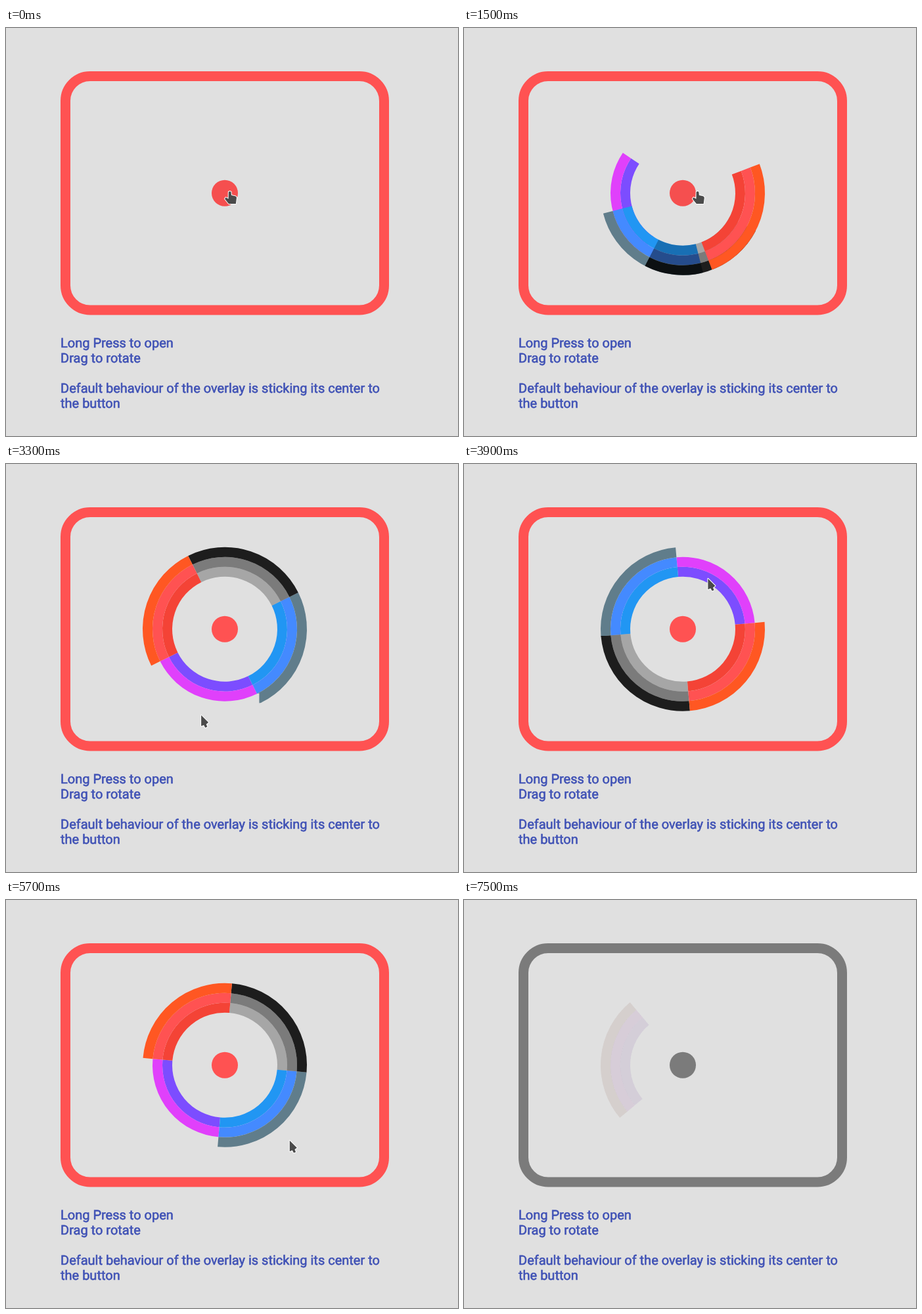
Recreate the animation shown at these times as an HTML page with a canvas. Size 688x622 px, loop 7700 ms.

```html
<!DOCTYPE html>
<html lang="en">
<head>
<meta charset="utf-8">
<title>Radial colour picker</title>
<style>
html, body { margin: 0; width: 100%; height: 100%; overflow: hidden; background: #e0e0e0; }
canvas { display: block; }
</style>
</head>
<body>
<canvas id="stage" width="688" height="622"></canvas>
<script>
const ctx = document.getElementById('stage').getContext('2d');
const LOOP = 7700, STEP = 100, CX = 333, CY = 251.75;
const RED = '#ff5252', GREY = '#7b7b7b';
const OPEN = 1200, CLOSED = 7403, SPREAD = 940, FADE = 101;

// Each sector lists its rings from the inside out.
const sectors = [
  ['#f44336', RED, '#ff5722'],
  ['rgba(0,0,0,.26)', 'rgba(0,0,0,.45)', 'rgba(0,0,0,.87)'],
  ['#2196f3', '#448aff', '#607d8b'],
  ['#7c4dff', '#e040fb']
];

const lines = ['Long Press to open', 'Drag to rotate', '',
  'Default behaviour of the overlay is sticking its center to', 'the button'];

// Pointer moves around the centre: angle and distance, plus the menu's spin they lead to.
const moves = [
  { from: 1300, to: 1500, angle: -7, dist: 23, spin: 0 },
  { from: 1500, to: 2100, angle: -22, dist: 95, spin: 0 },
  { from: 2186, to: 3900, angle: 656.5, dist: 86, spin: 715, bulge: 60 },
  { from: 4200, to: 4600, angle: 750, dist: 142, spin: 812 },
  { from: 4600, to: 4900, angle: 679.7, dist: 115, spin: 812 },
  { from: 5000, to: 5600, angle: 772, dist: 155, spin: 905 },
  { from: 5600, to: 6300, angle: 723.8, dist: 94, spin: 905 }
];

const arrow = [[0, 0], [0, 16.5], [4, 14.8], [6.2, 18.8], [9.3, 17.4], [7.6, 13.6], [11, 11]];
const hand = [[-2.2, 1], [-.5, 0], [1.5, .8], [2, 6], [8.5, 7.6], [10, 9.5], [8.8, 19],
  [-2, 19], [-8, 11.5], [-6.5, 9.3], [-2.4, 11.5]];

const clamp = v => Math.max(0, Math.min(1, v));
const smooth = u => u * u * (3 - 2 * u);
const mix = (a, b, u) => a + (b - a) * u;
const rad = deg => deg * Math.PI / 180;

function poseAt(t) {
  let angle = -19, dist = 8.5, spin = 0;
  for (const m of moves) {
    const u = clamp((t - m.from) / (m.to - m.from)), e = smooth(u);
    angle = mix(angle, m.angle, e);
    dist = mix(dist, m.dist, e) + (m.bulge || 0) * Math.sin(Math.PI * u) ** 2;
    spin = mix(spin, m.spin, e);
  }
  const leave = clamp((t - 6600) / 700);
  return {
    x: mix(CX + dist * Math.cos(rad(angle)), 17, leave),
    y: mix(CY + dist * Math.sin(rad(angle)), 35, leave),
    spin
  };
}

function disc(color) {
  ctx.fillStyle = color;
  ctx.beginPath();
  ctx.arc(CX, CY, 20, 0, 7);
  ctx.fill();
}

function drawMenu(t, spin) {
  const age = Math.min(t - OPEN, CLOSED - t);
  const gap = 90 * (1 - (1 - clamp(age / SPREAD)) ** 2);
  ctx.globalAlpha = clamp(1 + age / FADE);
  ctx.lineWidth = 15;
  for (let i = 3; i >= 0; i--) {
    const start = spin - 45 + (i + .5) * gap;
    sectors[i].forEach((color, ring) => {
      ctx.strokeStyle = color;
      ctx.beginPath();
      ctx.arc(CX, CY, 87.5 + ring * 15, rad(start), rad(start + 90));
      ctx.stroke();
    });
  }
  ctx.globalAlpha = 1;
}

function drawCursor({ x, y }, shape) {
  ctx.save();
  ctx.translate(x, y);
  ctx.beginPath();
  shape.forEach(p => ctx.lineTo(...p));
  ctx.closePath();
  ctx.lineJoin = 'round';
  ctx.lineWidth = 2;
  ctx.strokeStyle = '#fff';
  ctx.stroke();
  ctx.fillStyle = '#4a4a4a';
  ctx.fill();
  ctx.restore();
}

function drawText() {
  ctx.font = '20px Roboto, sans-serif';
  ctx.textRendering = 'geometricPrecision';
  ctx.fillStyle = ctx.strokeStyle = '#3f51b5';
  ctx.lineWidth = .6;
  lines.forEach((text, i) => {
    ctx.fillText(text, 83, 487 + i * 23);
    ctx.strokeText(text, 83, 487 + i * 23);
  });
}

function draw(now) {
  const t = Math.floor(now % LOOP / STEP) * STEP;
  const color = t < 6500 ? RED : GREY, hover = t < 1600, pose = poseAt(t);
  ctx.fillStyle = '#e0e0e0';
  ctx.fillRect(0, 0, 688, 622);
  ctx.strokeStyle = color;
  ctx.lineWidth = 15;
  ctx.beginPath();
  ctx.roundRect(90.5, 73.5, 485, 356.5, 37.5);
  ctx.stroke();
  drawText();
  disc(color);
  if (hover) disc('rgba(0,0,0,.04)');
  drawMenu(t, pose.spin);
  if (t < 7400) drawCursor(pose, hover ? hand : arrow);
}

let begin;
function tick(now) {
  begin ??= now;
  draw(now - begin);
  requestAnimationFrame(tick);
}
requestAnimationFrame(tick);
</script>
</body>
</html>
```
